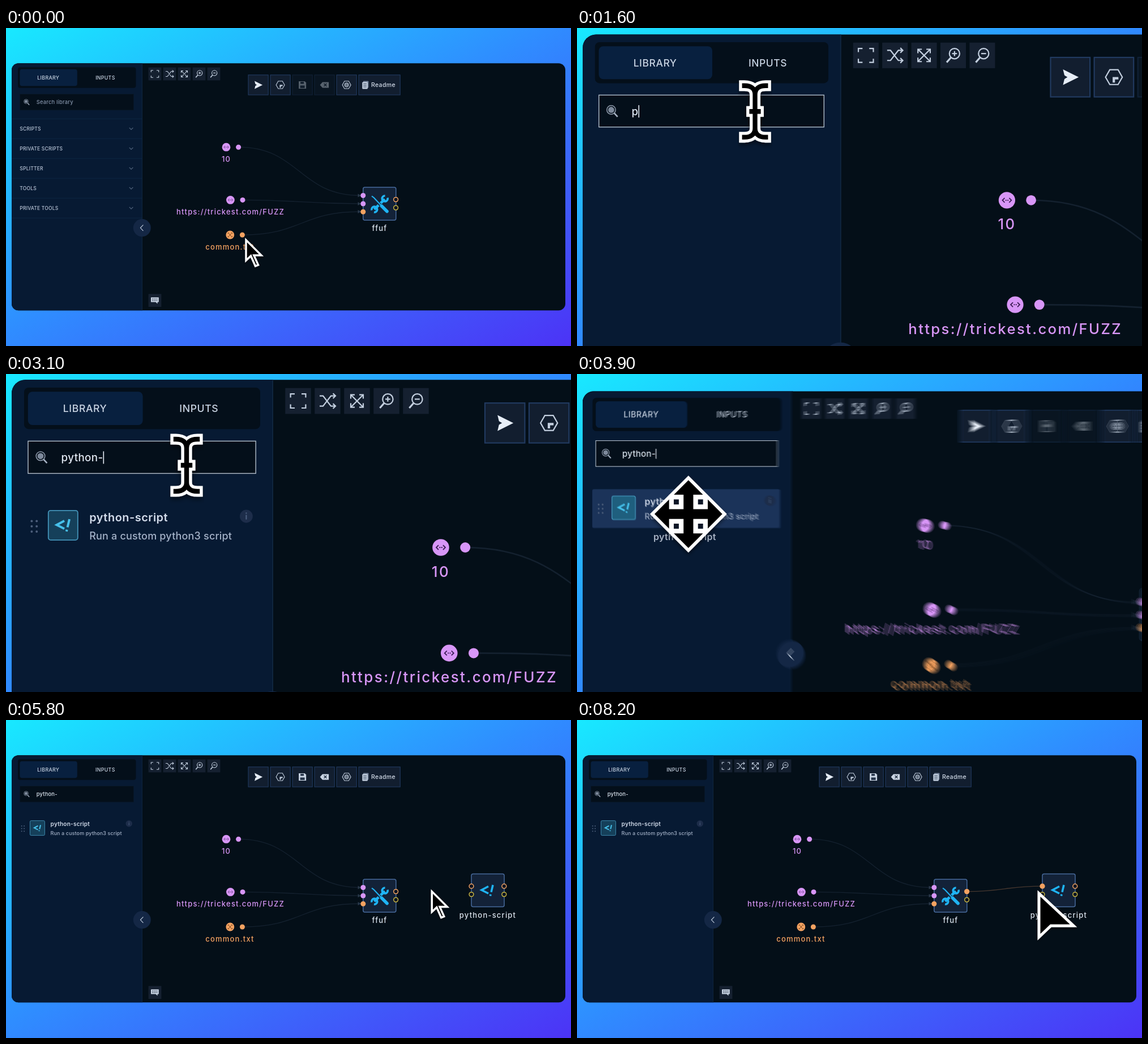
Animation, 998 px wide and 561 px high, one loop 8.3 s. Source, as an HTML page:

```html
<!DOCTYPE html>
<html lang="en">
<head>
<meta charset="utf-8">
<title>Workflow editor</title>
<style>
html, body { margin: 0; width: 100%; height: 100%; overflow: hidden; background: #2f8bff; }
svg { display: block; width: 100vw; height: 100vh; }
text { font-family: Inter, "Open Sans", sans-serif; font-weight: 500; white-space: pre; }
.label { font-size: 13px; letter-spacing: 1.2px; text-anchor: middle; }
.port { font-size: 11px; letter-spacing: 1.15px; fill: #f0a061; }
.cat { font-size: 8.5px; letter-spacing: .2px; fill: #bac6d8; }
.tab { font-size: 8.8px; letter-spacing: .32px; fill: #c8d3e2; text-anchor: middle; }
.field { font-size: 9.4px; letter-spacing: .18px; }
.title { font-size: 10px; font-weight: 600; letter-spacing: .24px; }
.line { fill: none; stroke: #c3cfdf; stroke-width: 1.1; }
.edge { fill: none; stroke: #14212f; stroke-width: 1.3; }
</style>
</head>
<body>
<svg viewBox="0 0 998 561" preserveAspectRatio="none" xmlns="http://www.w3.org/2000/svg">
  <defs>
    <linearGradient id="sky" x1="0" y1="0" x2="1" y2="1">
      <stop offset="0" stop-color="#18e9ff"/>
      <stop offset=".48" stop-color="#2f8dff"/>
      <stop offset="1" stop-color="#4c33f6"/>
    </linearGradient>
    <clipPath id="window"><rect x="10" y="62.3" width="978" height="436" rx="12"/></clipPath>
    <filter id="shade" x="-30%" y="-30%" width="160%" height="170%">
      <feDropShadow dx="0" dy="2.2" stdDeviation="2" flood-color="#000" flood-opacity=".5"/>
    </filter>
  </defs>
  <rect width="998" height="561" fill="url(#sky)"/>
  <g id="view"></g>
  <g id="hand"></g>
</svg>
<script>
const LOOP = 8300, STEP = 100, COPIES = 6;
const PURPLE = '#d896f7', ORANGE = '#f4a261', YELLOW = '#c9b440', CYAN = '#1fb4f4';
const TYPED = 'python-';
const TYPE_AT = 1550, KEY_MS = 140, LIST_AT = 2500;
const FOCUS_AT = 1150, DRAG_AT = 3650, DROP_AT = 4950, WIRE_AT = 6400, LINK_AT = 7700;
const $ = id => document.getElementById(id);
const at = (x, y, body, attrs = '') => `<g transform="translate(${x} ${y})" ${attrs}>${body}</g>`;
const box = (x, y, w, h, fill, more = '') =>
  `<rect x="${x}" y="${y}" width="${w}" height="${h}" fill="${fill}" ${more}/>`;
const dot = (x, y, r, fill, more = '') => `<circle cx="${x}" cy="${y}" r="${r}" fill="${fill}" ${more}/>`;
const ring = (x, y, color, id = '') => dot(x, y, 3.9, '#0a1522', `stroke="${color}" stroke-width="1.5" ${id}`);
const text = (x, y, str, cls, fill = '', more = '') =>
  `<text x="${x}" y="${y}" class="${cls}" ${fill && `fill="${fill}"`} ${more}>${str}</text>`;
const line = (d, more = '') => `<path class="line" d="${d}" ${more}/>`;
const wire = (x1, y1, x2, y2) => {
  const m = (x1 + x2) / 2;
  return `M${x1} ${y1}C${m} ${y1} ${m} ${y2} ${x2} ${y2}`;
};

// Icons, all centred on 0,0
const lens = sign => `<circle class="line" cx="1.2" cy="-1.6" r="4.6"/>` +
  line('M-2 1.8L-5.8 6.2', 'style="stroke-width:1.6"') + line(sign);
const angle = '<path d="M2 -7L-10 -.5L2 5.5" fill="none" stroke-width="3.6"/><path d="M10 -9.5L7 3.2M6 7L5.4 9.8" fill="none" stroke-width="3.6"/>';
const hexagon = 'M-3.7 -6.6H3.7L7.5 0L3.7 6.6H-3.7L-7.5 0Z';
const icon = {
  frame: line('M-6.7 -3V-6.2H-3M3 -6.2H6.7V-3M6.7 3V6.2H3M-3 6.2H-6.7V3'),
  shuffle: line('M-7 -4.5H-4L3 4.5H7M-7 4.5H-4L3 -4.5H7M4.8 -6.7L7 -4.5L4.8 -2.3M4.8 2.3L7 4.5L4.8 6.7'),
  expand: line('M-5.3 -5.3L5.3 5.3M5.3 -5.3L-5.3 5.3M-5.5 -2V-5.5H-2M2 -5.5H5.5V-2M5.5 2V5.5H2M-2 5.5H-5.5V2'),
  plus: lens('M-1 -1.6H3.4M1.2 -3.8V.6'),
  minus: lens('M-1 -1.6H3.4'),
  run: '<path d="M-6.5 -7L7.5 0L-6.5 7L-5.2 1.6L-2.5 0L-5.2 -1.6Z" fill="#e6edf6"/>',
  hex: line(hexagon) + line('M-.1 4.8V1H4', 'style="stroke-width:2.1"'),
  save: '<path d="M-6.5 -6.5H4L6.5 -4V6.5H-6.5Z" fill="#c9d4e3"/>' + box(-3.5, -5.5, 6, 3.6, '#243349') + box(-4, 1, 8, 4.5, '#243349'),
  erase: '<path d="M-8 0L-3.6 -5H7.5V5H-3.6Z" fill="#c9d4e3"/><path d="M-1 -2.4L3.8 2.4M3.8 -2.4L-1 2.4" stroke="#1a283b" stroke-width="1.3"/>',
  cycle: line(hexagon) + '<circle class="line" r="3.6"/>' + line('M-1.6 -1.6H1.6V1.6H-1.6Z'),
  page: box(-4.2, -6.8, 9.5, 12, '#74839a', 'rx="1"') + box(-5.8, -5, 9.5, 12, '#c3cfdf', 'rx="1"') +
    '<path d="M-4 -2H2M-4 .8H2M-4 3.6H2" stroke="#334359"/>',
  chat: '<path d="M-7 -5.4H6.8V3H4.6V6L1.4 3H-7Z" fill="#c9d4e3"/><path d="M-5 -2.6H4.8M-5 .2H4.8" stroke="#1a2738" stroke-dasharray="2 .8"/>',
  brace: '<path d="M-2 -2L-4 0L-2 2M2 -2L4 0L2 2M-1.3 0H-.3M.4 0H1.4" fill="none" stroke="#3b1c55" stroke-width=".9"/>',
  file: '<path d="M-2 -2.4L2 2.4M2 -2.4L-2 2.4M-3.6 -2V-3.6H-2M2 3.6H3.6V2M-3.6 2V3.6H-2M3.6 -2V-3.6H2" fill="none" stroke="#57300f" stroke-width=".8"/>',
  tools: `<g fill="none" stroke="${CYAN}">
    <path d="M-9.5 9.5L9 -8.5" stroke-width="4.6"/>
    <path d="M14 -11A5 5 0 1 1 9.5 -14.5M-14 11A5 5 0 1 1 -10 14.5" stroke-width="3.6"/>
    <path d="M-14 -14L3 3.5" stroke="#15253c" stroke-width="5"/>
    <path d="M-14 -14L-10 -11L3 3" stroke-width="2"/>
    <path d="M3.5 3.5L13 13" stroke-width="5.6" stroke-linecap="round"/></g>`,
};

function sidebar() {
  const cats = ['SCRIPTS', 'PRIVATE SCRIPTS', 'SPLITTER', 'TOOLS', 'PRIVATE TOOLS'];
  const rows = cats.map((name, i) => {
    const y = 177.5 + 35 * i;
    return text(24.3, y + 3.1, name, 'cat') + line(`M217.8 ${y - 1.6}l3.3 3.3l3.3 -3.3`, 'style="stroke:#53657f"');
  }).join('');
  const rules = [...Array(6)].map((_, i) => `M10 ${160.2 + 35 * i}H240`).join('');
  const grips = [...Array(6)].map((_, i) => dot(27.7 + 4.4 * (i % 2), 187 + 4.6 * (i >> 1), 1, '#4d5f7c')).join('');
  return box(10, 62, 230.5, 437, '#071a33') + box(240, 62, 1, 437, '#10263f') +
    box(21, 69.2, 208.5, 36.6, '#040f1a', 'rx="4"') + box(24.4, 72.8, 101.4, 29.4, '#08203f', 'rx="4"') +
    text(74.8, 90.7, 'LIBRARY', 'tab') + text(175.4, 90.7, 'INPUTS', 'tab') +
    box(24.5, 116.4, 201.1, 28.5, '#040f1a', 'id="search" stroke-width=".7"') +
    dot(35.5, 129.6, 3.9, 'none', 'stroke="#8c98a9" stroke-width=".8"') + dot(35.5, 129.6, 2.7, '#7d899b') +
    line('M38.2 132.5L41.2 135.8', 'style="stroke-width:1.3;stroke:#a5b1c2"') +
    text(53.8, 134.2, '', 'field', '', 'id="query"') + box(0, 125.4, .8, 11, '#e8eef7', 'id="caret"') +
    `<g id="cats">${line(rules, 'style="stroke:#0d2642;stroke-width:1"')}${rows}</g>` +
    `<g id="result">${box(20.6, 170, 208, 43, '#1b3359', 'id="hover" rx="2"')}${grips}
      ${box(42.4, 177.6, 26, 26, '#15405a', 'id="badge" rx="2" stroke="#4393b8" stroke-width=".9"')}
      ${at(55.4, 190.6, `<g transform="scale(.56)" stroke="#46c0ea">${angle}</g>`)}
      ${text(78.6, 187.4, 'python-script', 'title', '#d3dceb')}
      <text x="78.6" y="203.3" font-size="9" letter-spacing=".1" fill="#a4b2c8">Run a custom python3 script</text>
      ${dot(217.2, 182.7, 5.7, '#1d2d4a')}${box(216.7, 181.5, 1, 4, '#4e6282')}${box(216.7, 179.4, 1, 1.1, '#4e6282')}</g>`;
}

function toolbar() {
  const small = ['frame', 'shuffle', 'expand', 'plus', 'minus'].map((name, i) =>
    at(263 + 26 * i, 81, box(-11.4, -11.4, 22.8, 22.8, '#152030') + icon[name])).join('');
  const frame = w => box(-17.6, -17.6, w, 35.2, '#121e2f', 'stroke="#213a60" stroke-width="1.1"');
  const large = ['run', 'hex', 'save', 'erase', 'cycle'].map((name, i) =>
    at(445.6 + 39 * i, 100.4, frame(35.2) + icon[name], i == 2 || i == 3 ? 'class="dirty"' : '')).join('');
  return small + large + at(640.6, 100.4, frame(73.2) + at(-5.5, 0, icon.page) +
    '<text x="4.4" y="3.7" font-size="10.5" letter-spacing=".35" fill="#d3dce9">Readme</text>') +
    at(263, 480.6, box(-11.4, -11.4, 22.8, 22.8, '#152030') + icon.chat);
}

function graph() {
  const input = (x, y, tx, name, color, pic) => at(x, y, dot(0, 0, 7.4, color) + pic) +
    dot(x + 21.6, y, 4.5, color) + text(tx, y + 26, name, 'label', color);
  const block = (x, y) => box(x, y, 58, 58, '#132238', 'rx="3" stroke="#476a9c" stroke-width="1.5"');
  const tip = y => `<path d="M621.5 ${y - 3}L627.5 ${y}L621.5 ${y + 3}Z" fill="#2a394b"/>`;
  const edges = [[410.5, 210.2, 295.5], [418, 303.4, 310], [417.5, 365, 324]].map(([x, y, end]) =>
    `<path class="edge" d="${wire(x, y, 626, end)}"/>` + tip(end)).join('');
  return `<g id="edges">${edges}</g><path id="wire" fill="none"/>` +
    input(389, 210.2, 389, '10', PURPLE, icon.brace) +
    input(396.4, 303.4, 396.5, 'https://trickest.com/FUZZ', PURPLE, icon.brace) +
    input(395.8, 365, 395.5, 'common.txt', ORANGE, icon.file) +
    block(630.8, 281) + at(660, 310.5, icon.tools) +
    dot(630.8, 295.5, 4.5, PURPLE) + dot(630.8, 310, 4.5, PURPLE) + dot(630.8, 324.2, 4.5, ORANGE) +
    ring(688.6, 302.6, ORANGE, 'id="out"') + ring(688.6, 317.1, YELLOW) + text(660, 358.3, 'ffuf', 'label', '#dde5ef') +
    `<g id="script">${block(822, 271.5)}${at(850, 300.5, `<g stroke="${CYAN}">${angle}</g>`)}
      ${ring(822, 293.2, ORANGE, 'id="in"')}${ring(822, 307.6, YELLOW)}
      ${ring(879.8, 293.2, ORANGE)}${ring(879.8, 307.6, YELLOW)}
      ${text(851, 349, 'python-script', 'label', '#dde5ef')}</g>` +
    `<g id="ports">${text(571, 327.4, 'wordlist', 'port')}${text(698.5, 306, 'file', 'port')}${text(791.5, 296.2, 'file', 'port')}
      ${dot(0, 0, 3, '#0a1522', `id="end" stroke="${ORANGE}" stroke-width="1.3"`)}</g>`;
}

const beam = 'M-9.5 -23C-3 -23 0 -20 0 -15V15C0 20 -3 23 -9.5 23M9.5 -23C3 -23 0 -20 0 -15M0 15C0 20 3 23 9.5 23M-3 0H3';
const arrow = (pts, w) => `<polygon points="${pts}" fill="#000" stroke="#fff" stroke-width="${w}"/>`;
const cursors = {
  point: arrow('2,5 2,41 10.5,33 18.5,51 23.5,49 15.8,32 29,32', 3.4),
  big: arrow('3,9 3,86 24,66 64,66', 5),
  beam: `<g fill="none" stroke-linecap="square"><path d="${beam}" stroke="#fff" stroke-width="9.6"/><path d="${beam}" stroke="#000" stroke-width="4.2"/></g>`,
  move: '<path d="M0 -40L40 0L0 40L-40 0Z" fill="#000" stroke="#fff" stroke-width="3.6"/>' +
    [[-1, -1], [1, -1], [-1, 1], [1, 1]].map(([x, y]) =>
      box(13.4 * x - 5.4, 13.4 * y - 5.4, 10.8, 10.8, '#0b1626', 'stroke="#fff" stroke-width="5.2"')).join(''),
  grab: `<g stroke-linecap="round" stroke-linejoin="round">
    <path d="M-9 21C-10 15 -15 9 -19 4C-22 0 -17 -3 -14 0L-9 5L-13 -12C-14 -17 -8 -18 -7 -13L-3 -2L-4 -18C-4 -23 3 -23 3 -18L4 -2L7 -15C8 -20 14 -18 13 -13L11 0L15 -7C18 -11 22 -8 20 -4C17 4 15 13 12 21Z" fill="#fff" stroke="#0a0f16" stroke-width="1.5"/>
    <path d="M-4 4V13M2 4V13M8 4V13" stroke="#000" stroke-width="2"/></g>`,
};

// Stacked copies at 1, 1/2, 1/3 ... opacity average out to a motion blur
$('view').innerHTML = [...Array(COPIES)].map((_, i) => `<g class="cam" opacity="${1 / (i + 1)}">` +
  (i ? '<use href="#scene"/>' : '<g id="scene"></g>') + '</g>').join('');
$('scene').innerHTML = `<g clip-path="url(#window)">${box(10, 62, 978, 437, '#040f18')}${sidebar()}${toolbar()}${graph()}
  ${dot(240.3, 352.6, 15.5, '#142745')}${line('M242.4 347.4L237.4 352.6L242.4 357.8')}</g>`;
$('hand').innerHTML = text(0, 0, 'python-script', 'title', '#a9b4c5', 'id="ghost" text-anchor="middle"') +
  `<g id="cursor" filter="url(#shade)">${Object.entries(cursors).map(([k, v]) => `<g id="${k}">${v}</g>`).join('')}</g>`;

// time, x, y, and 1 where the pointer passes without stopping
const path = [
  [0, 422, 369], [200, 422, 369], [1100, 164, 131], [2500, 164, 131], [3100, 164.5, 137.7, 1],
  [3550, 125, 196], [3900, 127, 197.5], [4700, 833, 290], [5250, 833, 290], [6250, 689, 303],
  [6400, 689, 303], [7100, 764, 290, 1], [7700, 813, 297], [8300, 813, 297],
];

function pointer(t) {
  const i = path.findIndex(p => p[0] > t) - 1;
  const a = path[i], b = path[i + 1], span = b[0] - a[0], u = (t - a[0]) / span;
  const slope = (k, c) => path[k][3] ? (path[k + 1][c] - path[k - 1][c]) / (path[k + 1][0] - path[k - 1][0]) * span : 0;
  return [1, 2].map(c => {
    const v = u * u * (3 - 2 * u);
    return a[c] + (b[c] - a[c]) * v + slope(i, c) * u * (1 - u) ** 2 - slope(i + 1, c) * u * u * (1 - u);
  });
}

// Critically damped spring: 1 at the start, settling to 0
function settle(ms) {
  const x = Math.max(0, ms) * .0058;
  return (1 + x) * Math.exp(-x);
}
const zoom = t => t < 3661 ? 2 - settle(t - 620) : 1 + settle(t - 3661);
const camera = s => `translate(${10 * (1 - s)} ${114.4 * (1 - s)}) scale(${s})`;

const show = (id, on) => { $(id).style.display = on ? '' : 'none'; };
const cams = [...document.querySelectorAll('.cam')];
const dirty = [...document.querySelectorAll('.dirty')];

function draw(t) {
  const [x, y] = pointer(t);
  const moving = Math.abs(zoom(t + 8) - zoom(t - 8)) > .002;
  cams.forEach((g, i) => {
    const shift = (i / (COPIES - 1) - .5) * 12;
    g.setAttribute('transform', camera(zoom(moving ? t + shift : t)));
    g.style.display = moving || !i ? '' : 'none';
  });
  $('hand').setAttribute('transform', camera(zoom(t)));

  const keys = t < TYPE_AT ? 0 : Math.min(TYPED.length, 1 + Math.floor((t - TYPE_AT) / KEY_MS));
  const focus = t >= FOCUS_AT && t < DROP_AT;
  const query = $('query');
  query.textContent = keys ? TYPED.slice(0, keys) : 'Search library';
  query.setAttribute('fill', keys ? '#e0e8f2' : '#8493a9');
  $('search').setAttribute('stroke', focus ? '#b4bfcc' : '#0a1a2c');
  $('caret').setAttribute('x', 53.8 + (keys ? query.getComputedTextLength() : 0));
  show('caret', focus);
  show('cats', !keys);
  show('result', t >= LIST_AT);
  const hover = x < 229 && y > 170 && y < 213;
  show('hover', hover);
  $('badge').setAttribute('fill', hover ? '#1f5f7e' : '#15405a');

  const dropped = t >= DROP_AT, wiring = t >= WIRE_AT && t < LINK_AT, linked = t >= LINK_AT;
  dirty.forEach(g => g.setAttribute('opacity', dropped ? 1 : .42));
  show('script', dropped);
  show('edges', !wiring);
  show('ports', wiring);
  show('wire', wiring || linked);
  const ex = linked ? 822 : x + 1.5, ey = linked ? 293.2 : y - 1;
  const cable = $('wire');
  cable.setAttribute('d', wire(688.6, 302.6, ex, ey));
  cable.setAttribute('stroke', linked ? '#46372f' : '#a96b40');
  cable.setAttribute('stroke-width', linked ? 1.3 : 1);
  $('end').setAttribute('cx', ex);
  $('end').setAttribute('cy', ey);
  $('out').setAttribute('fill', wiring || linked ? ORANGE : '#0a1522');
  $('in').setAttribute('fill', linked ? ORANGE : '#0a1522');

  const overField = y > 117 && y < 146 && x < 226;
  const kind = t >= WIRE_AT ? 'big' : t >= DROP_AT ? 'point' : t >= 4300 ? 'grab' :
    t >= DRAG_AT ? 'move' : overField ? 'beam' : 'point';
  Object.keys(cursors).forEach(k => show(k, k === kind));
  $('cursor').setAttribute('transform', `translate(${x} ${y}) scale(${wiring ? .8 : 1})`);
  show('ghost', t >= DRAG_AT && t < DROP_AT);
  $('ghost').setAttribute('x', x - 4);
  $('ghost').setAttribute('y', y + 28.5);
}

function tick() {
  draw(Math.floor(performance.now() % LOOP / STEP) * STEP);
  requestAnimationFrame(tick);
}
tick();
</script>
</body>
</html>
```
